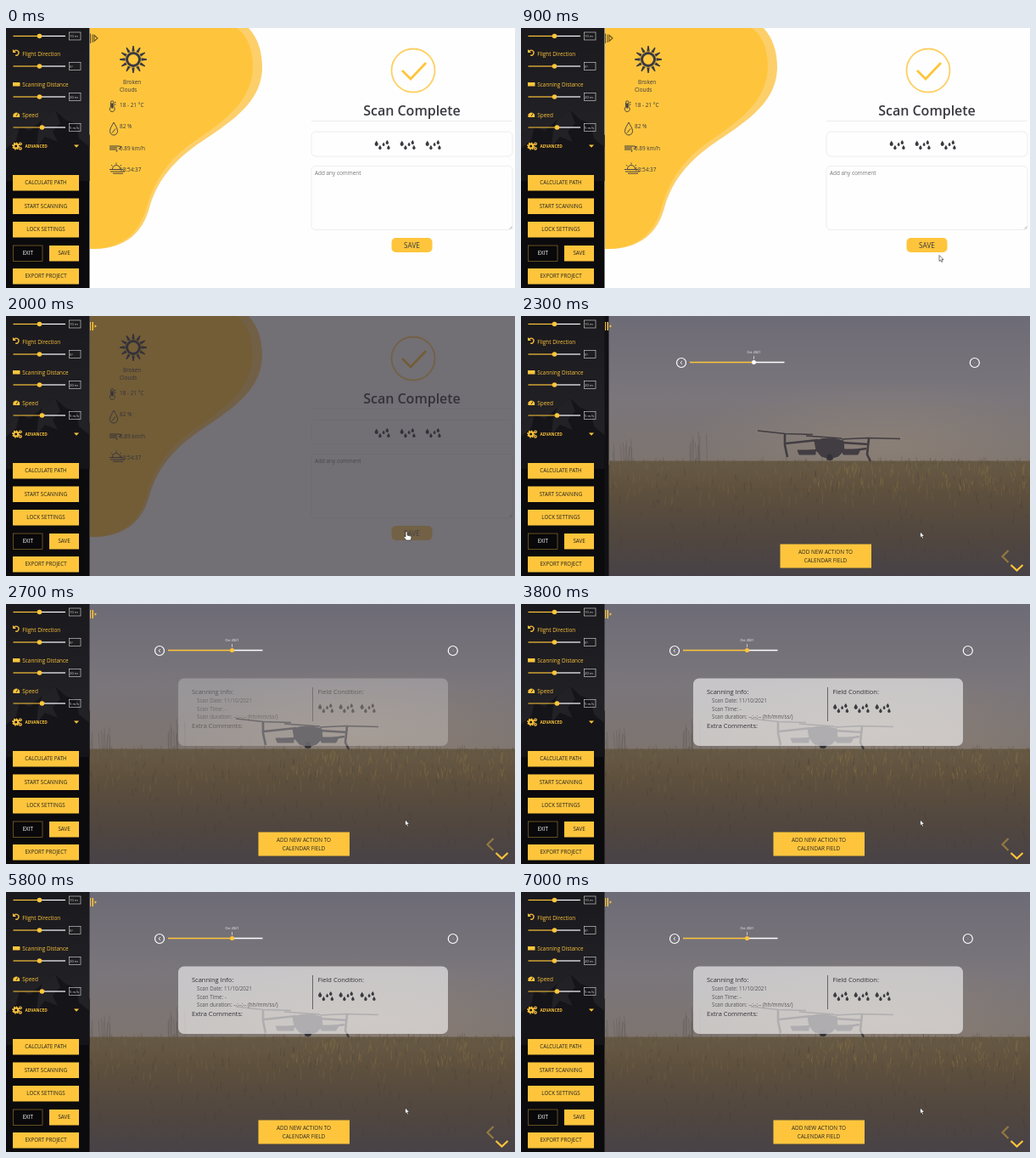
An HTML page that plays this animation: 600 by 306 pixels, repeating every 7200 ms.

```html
<!DOCTYPE html>
<html lang="en">
<head>
<meta charset="utf-8">
<title>Scan complete</title>
<style>
html, body { margin: 0; width: 100%; height: 100%; overflow: hidden; background: #fefefe; }
svg { display: block; width: 600px; height: 306px; font-family: "Open Sans", "Noto Sans", sans-serif; font-size: 6.4px; }
.mid { text-anchor: middle; }
.yellow { fill: #fec53c; }
.line { fill: none; stroke: #fec53c; }
.ink { fill: #3a3a40; }
.inkLine { fill: none; stroke: #3a3a40; }
.frame { fill: none; stroke: #ededed; }
</style>
</head>
<body>
<svg viewBox="0 0 600 306">
  <defs>
    <linearGradient id="sky" x1="0" y1="0" x2="0" y2="1">
      <stop stop-color="#6d6b76"/><stop offset=".55" stop-color="#7a767b"/><stop offset="1" stop-color="#7d746f"/>
    </linearGradient>
    <linearGradient id="field" x1="0" y1="0" x2="0" y2="1">
      <stop stop-color="#675a45"/><stop offset=".25" stop-color="#5e503d"/><stop offset=".65" stop-color="#51473f"/><stop offset="1" stop-color="#484247"/>
    </linearGradient>
    <linearGradient id="night" x1="0" y1="0" x2="0" y2="1">
      <stop stop-color="#1a191d"/><stop offset=".4" stop-color="#222125"/><stop offset=".58" stop-color="#0b0a0d"/>
    </linearGradient>
    <radialGradient id="glow">
      <stop stop-color="#a08f7c" stop-opacity=".4"/><stop offset="1" stop-color="#a08f7c" stop-opacity="0"/>
    </radialGradient>
    <path id="drop" d="M0-3.2C.8-1.5 2.1-.4 2.1 1A2.1 2.1 0 0 1-2.1 1C-2.1-.4-.8-1.5 0-3.2"/>
    <g id="drops" class="ink">
      <use href="#drop" x="-6.8" y="-1.2"/>
      <use href="#drop" transform="translate(-2.600 3.500) scale(.85)"/>
      <use href="#drop" transform="translate(1.600 -.200) scale(.7)"/>
      <use href="#drop" transform="translate(5.800 -2.600) scale(.8)"/>
      <use href="#drop" transform="translate(7.400 3.400) scale(.85)"/>
    </g>
  </defs>

  <g id="scanPage">
    <rect width="600" height="306" fill="#fefefe"/>
    <path fill="#fdcf6a" d="M99 0H286C297 12 302 28 302 46C302 88 264 111 230 134C196 157 179 180 170 208C162 241 141 261 99 260Z"/>
    <path class="yellow" d="M99 0H272C286 10 291 27 291 46C290 86 258 109 224 132C189 156 176 180 167 207C158 241 139 260 99 260Z"/>
    <circle class="inkLine" cx="150" cy="37" r="7.500" stroke-width="3"/>
    <g id="rays" class="ink"></g>
    <g class="inkLine" stroke-width=".9">
      <path d="M123.500 93V87.500a1.700 1.700 0 0 1 3.400 0V93a3 3 0 1 1-3.400 0M128 87.500h1.500M128 90h1.500"/>
      <path d="M125.200 88.500v6" stroke-width="2"/>
      <path d="M127 111C129 115 131.500 118 131.500 121.500a4.500 4.500 0 0 1-9 0C122.500 118 125 115 127 111M125 123.500l4-5"/>
      <path d="M122 139h11q3 0 2.500 2t-3 1M122 141h9M122 143h8q2 1 0 3" stroke-width="1"/>
      <path d="M125.500 166a4.500 4.500 0 0 1 9 0M122 166.500h16M123 169h17M126 171.200h12M130 158.500v2M124 161l1.500 1.500M136 161l-1.500 1.500"/>
    </g>
    <g class="ink">
      <text x="138" y="65.500">Broken</text><text x="134" y="75">Clouds</text>
      <text x="134" y="93.300">18 - 21 °C</text><text x="134" y="118.300">82 %</text>
      <text x="134" y="143.800">0.89 km/h</text><text x="134" y="169">18:54:37</text>
    </g>
    <circle class="line" cx="480" cy="50" r="25.500" stroke-width="1.800" opacity=".8"/>
    <path class="line" d="M467 50L477 60L495 41" stroke-width="2.800"/>
    <text class="mid ink" x="478.500" y="103" font-size="16" font-weight="600">Scan Complete</text>
    <path class="frame" d="M360 109.500H597"/>
    <rect class="frame" x="360" y="122" width="237" height="29" rx="5"/>
    <use href="#drops" x="443.500" y="137"/><use href="#drops" x="473.500" y="137"/><use href="#drops" x="503.500" y="137"/>
    <rect class="frame" x="360" y="162.500" width="237" height="75" rx="5"/>
    <path d="M593.500 236.500l3-3M595.500 236.500l1-1" stroke="#888" stroke-width=".6"/>
    <text x="364" y="173.300" fill="#757575">Add any comment</text>
    <g id="save">
      <rect class="yellow" x="454.500" y="247" width="48" height="17" rx="5"/>
      <text class="mid ink" x="478.500" y="258.700" font-size="8.200">SAVE</text>
    </g>
  </g>
  <rect id="shade" width="600" height="306" fill="#322d36"/>

  <g id="calendarPage">
    <rect x="90" width="510" height="306" fill="#111014"/>
    <g id="slide">
      <rect x="95.500" width="504.500" height="175" fill="url(#sky)"/>
      <ellipse cx="420" cy="150" rx="230" ry="75" fill="url(#glow)"/>
      <rect x="95.500" y="170.500" width="504.500" height="135.500" fill="url(#field)"/>
      <g id="grass" fill="none" stroke-width=".9"></g>
      <g fill="none" stroke="#413d42" stroke-linejoin="round">
        <path d="M271 135L303 138.500L336 139.500M328 141L370 144M370 145L400 143.500L439 144.500" stroke-width="1.400"/>
        <path d="M303 139V152L306 166M402 144L400 163L404 171M304 150L342 146M370 149L402 151M319 160L342 158M371 160L399 156" stroke-width="2.600"/>
        <path d="M318 158H339V163H320ZM370 157H392L389 163H372Z" fill="#413d42"/>
        <path d="M338 147Q355 141 372 147L373 158L366 165Q356 169 346 165L340 158Z" fill="#413d42"/>
        <circle cx="356" cy="166" r="4" fill="#343238"/>
      </g>
      <g fill="none" stroke="#fff">
        <circle cx="181" cy="55" r="5.500" stroke-width="1.200"/><path d="M182 53l-2 2 2 2" stroke-width=".8"/>
        <circle cx="526.800" cy="55" r="5.500" stroke-width="1.200"/><path d="M526.300 54l1 1-1 1" stroke-width=".4" opacity=".5"/>
        <path d="M266 54.500H302.500" stroke-width="1.300"/><path d="M266.500 47v4" stroke-width=".6"/>
      </g>
      <path class="line" d="M191 54.500H266" stroke-width="1.300"/>
      <circle id="thumb" cx="266.500" cy="54.500" r="2.500"/>
      <text class="mid" x="266.500" y="44" font-size="3.900" fill="#fff">Oct 2021</text>
      <rect class="yellow" x="297.500" y="268.500" width="107.500" height="28"/>
      <g class="mid" fill="#2b2925"><text x="351" y="280">ADD NEW ACTION TO</text><text x="351" y="289.700">CALENDAR FIELD</text></g>
    </g>
    <g id="card">
      <rect x="203" y="87.500" width="318" height="79.500" rx="7" fill="#fff" opacity=".58"/>
      <g fill="#333238" font-size="7.500">
        <text x="219" y="106.200">Scanning Info:</text><text x="219" y="145.800">Extra Comments:</text>
        <text x="367.500" y="106.200">Field Condition:</text>
      </g>
      <g fill="#56535a" font-size="6.200">
        <text x="225" y="116.300">Scan Date: 11/10/2021</text><text x="225" y="125.700">Scan Time: -</text>
        <text x="225" y="135.200">Scan duration: --:--:-- (hh/mm/ss/)</text>
      </g>
      <path class="inkLine" d="M361.500 98V138" stroke-width=".7"/>
      <use href="#drops" x="377" y="122"/><use href="#drops" x="401.500" y="122"/><use href="#drops" x="426.500" y="122"/>
    </g>
    <path class="line" d="M574.500 276L567.500 283L574.500 290" stroke-width="2.200" opacity=".4"/>
    <path class="line" d="M577.500 293L584.500 299.500L591.500 293" stroke-width="2.200"/>
  </g>

  <path id="closedHandle" d="M99.500 6.500V18M102 7.500V17M104 8.500L108 12L104 15.500Z" fill="none" stroke="#67531f" stroke-width="1.100"/>
  <path id="openHandle" class="yellow" d="M99 7h1v10h-1zM101.500 7h1.500v10h-1.500zM104.500 10.300L107 12L104.500 13.700z"/>

  <g id="sidebar">
    <rect width="98.500" height="306" fill="url(#night)"/>
    <path fill="#151418" d="M0 128L16 116L28 121L43 108L58 97L70 108L82 112L98.500 126V180H0Z"/>
    <path fill="#222125" d="M43 108L58 97L64 112L55 122L61 134L46 128L36 140L38 120ZM82 112L98.500 126V140L86 130ZM0 128L16 116L12 132L0 142Z"/>
    <g class="yellow">
      <path class="line" d="M9.500 27.500A3 3 0 1 1 11 32" stroke-width="1.300"/><path d="M8 25v4h4z"/>
      <path d="M8 64h8.500v4.500H8z"/>
      <path d="M8.500 105a4 4 0 1 1 7.500 0z"/><path d="M12 104l2-3.500" stroke="#111" stroke-width=".8"/>
      <g class="line" stroke-width="2"><circle cx="11.700" cy="139" r="2.500"/><circle cx="11.700" cy="139" r="3.600" stroke-dasharray="1.400"/>
        <g stroke-width="1.200"><circle cx="17" cy="136.300" r="1.300"/><circle cx="17" cy="141.800" r="1.300"/></g></g>
      <text x="22.500" y="140.700" font-size="4.800" font-weight="700">ADVANCED</text>
      <path d="M80 137.500h6l-3 3.300z"/>
    </g>
  </g>

  <path id="hand" fill="#fff" stroke="#222" stroke-width=".6" d="M-1 0Q0-1 1 0V4L5 5Q6 5 6 6.500L5 10H0L-3 6.500Q-3 5-1 6Z"/>
  <path id="arrow" fill="#fff" stroke="#222" stroke-width=".6" d="M0 0V7L1.600 5.500L2.800 8L4 7.400L2.900 5H5Z"/>
</svg>
<script>
const $ = id => document.getElementById(id);
const clamp = v => Math.min(1, Math.max(0, v));
const progress = (t, from, to) => clamp((t - from) / (to - from));
const add = (id, markup) => $(id).insertAdjacentHTML('beforeend', markup);
const show = (id, visible) => $(id).setAttribute('visibility', visible ? 'visible' : 'hidden');

function slider(y, thumb, value, label = '') {
  add('sidebar', `<path d="M${thumb} ${y}H70" stroke="#fff" stroke-width="1.2"/>
    <path class="line" d="M8.500 ${y}H${thumb}" stroke-width="1.2"/>
    <circle class="yellow" cx="${thumb}" cy="${y}" r="2.800"/>
    <rect x="74.500" y="${y - 4.5}" width="13.500" height="9" fill="none" stroke="#ddd" stroke-width=".6"/>
    <text x="75" y="${y + 1.5}" font-size="4.200" fill="#ddd">${value}</text>
    <text class="yellow" x="19.300" y="${y - 12.2}">${label}</text>`);
}

function button(x, y, width, label, outlined) {
  const box = outlined ? 'fill="#09080a" stroke="#a07d2c" stroke-width=".6"' : 'class="yellow"';
  add('sidebar', `<rect x="${x}" y="${y}" width="${width}" height="18.500" ${box}/>
    <text class="mid" x="${x + width / 2}" y="${y + 11.3}" font-size="6.200" fill="${outlined ? '#fff' : '#25231f'}">${label}</text>`);
}

slider(9.5, 39.5, '10 m');
slider(45, 39.5, '0°', 'Flight Direction');
slider(81, 39.5, '20 m', 'Scanning Distance');
slider(117, 42.5, '5 m/s', 'Speed');
['CALCULATE PATH', 'START SCANNING', 'LOCK SETTINGS'].forEach((label, i) => button(8, 173 + i * 27.5, 78, label));
button(8.5, 256, 34.5, 'EXIT', true);
button(51, 256, 35, 'SAVE');
button(8, 283, 78, 'EXPORT PROJECT');

for (let a = 0; a < 360; a += 30)
  add('rays', `<path d="M148.300 27.500L149.300 21H150.700L151.700 27.500Z" transform="rotate(${a} 150 37)"/>`);

let seed = 7;
const random = () => (seed = seed * 16807 % 2147483647) / 2147483647;

function grass(color, count, left, right, top, depth, height) {
  let d = '';
  for (let i = 0; i < count; i++)
    d += `M${left + random() * (right - left)} ${top + random() * depth}l${random() * 4 - 2} ${-height * (.4 + random() * .6)}`;
  add('grass', `<path d="${d}" stroke="${color}" opacity=".45"/>`);
}
grass('#5d513f', 170, 98, 600, 173, 6, 8);
grass('#756647', 150, 98, 600, 176, 50, 12);
grass('#8f7844', 90, 330, 590, 178, 30, 10);
grass('#463d35', 130, 98, 600, 185, 110, 10);
grass('#5d5553', 10, 100, 125, 172, 2, 30);
grass('#5d5553', 10, 190, 212, 172, 2, 38);

function draw(t) {
  const glide = 1 - (1 - progress(t, 500, 1300)) ** 2;
  const x = 562 - 90 * glide, y = 308 - 54 * glide;
  const hover = x < 502 && y < 264;
  const pointing = hover && t < 2100;

  $('save').setAttribute('opacity', hover ? .78 : 1);
  $('shade').setAttribute('opacity', .68 * progress(t, 1790, 2000));
  $('calendarPage').setAttribute('opacity', progress(t, 2000, 2250));
  $('slide').setAttribute('transform', `translate(${50 * (1 - progress(t, 2000, 2500)) ** 2})`);
  $('card').setAttribute('opacity', progress(t, 2500, 3000));
  $('thumb').setAttribute('fill', t < 2500 ? '#fff' : '#fec53c');
  show('closedHandle', t < 2000);
  show('openHandle', t >= 2000);
  show('hand', pointing);
  show('arrow', !pointing);
  $('hand').setAttribute('transform', `translate(${x} ${y})`);
  $('arrow').setAttribute('transform', `translate(${x - 1.5} ${y})`);
}

function tick() {
  draw(Math.floor(performance.now() % 7200 / 100) * 100);
  requestAnimationFrame(tick);
}
tick();
</script>
</body>
</html>
```
